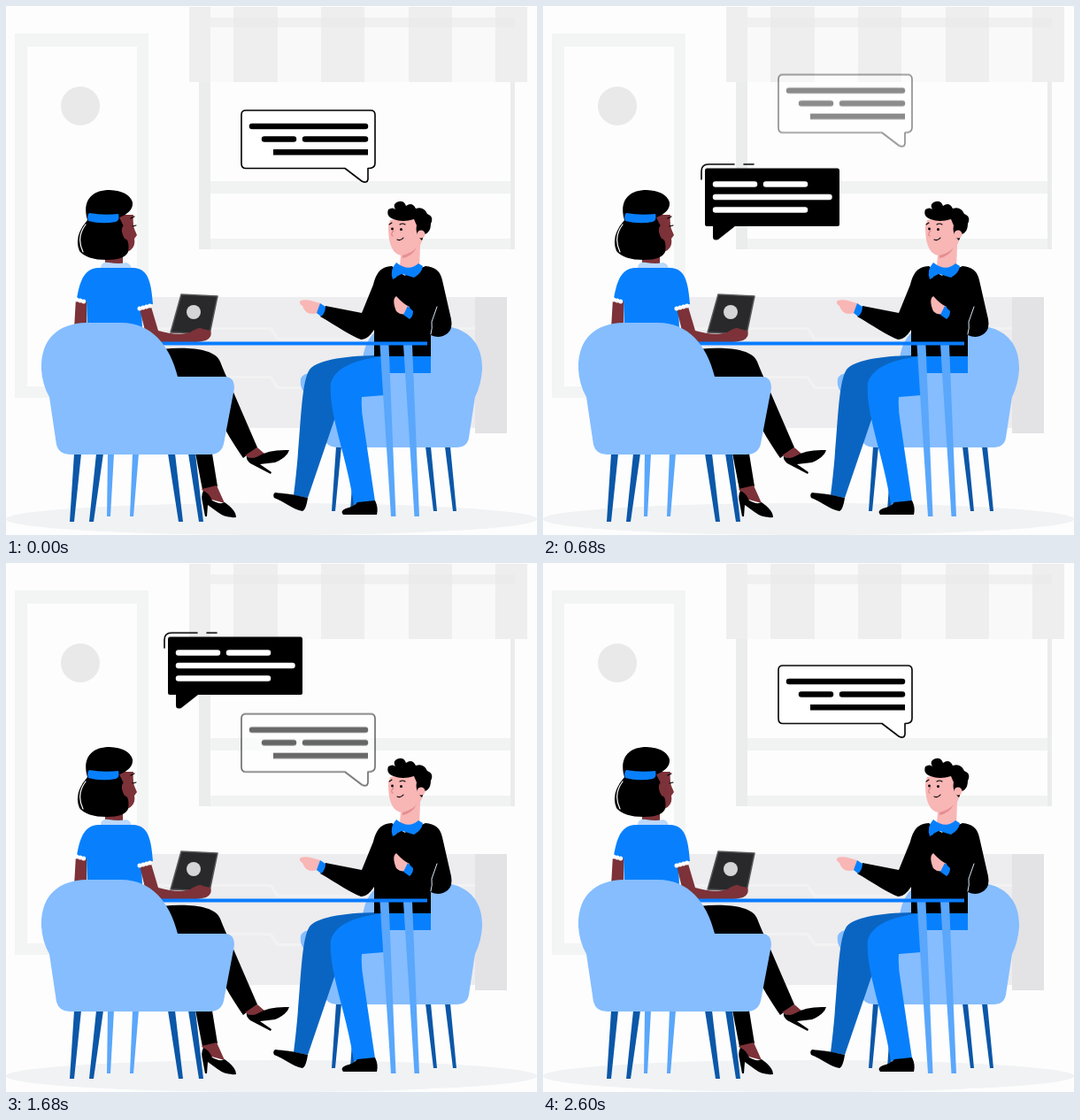
Recreate the animation shown at these times as an HTML page. Size 600 by 598 pixels, loop 2.64 s.

```html
<!DOCTYPE html>
<html lang="en">
<head>
<meta charset="utf-8">
<title>Conversation at a table</title>
<style>
html, body { margin: 0; width: 100%; height: 100%; overflow: hidden; background: #fdfdfd; }
svg { display: block; width: 100%; height: 100%; }
.round { stroke-linecap: round; stroke-linejoin: round; }
.skin { fill: #7c3238; }
.pink { fill: #f8b6b5; }
.blue { fill: #0880fd; }
.pale { fill: #85bdff; }
.navy { fill: #0b57a8; }
.sky { fill: #5aa7fb; }
.line { fill: none; stroke-linecap: round; }
#reply { animation: reply-rise 2640ms linear infinite, reply-fade 2640ms linear infinite; }
#ask { animation: ask-rise 2640ms linear infinite, ask-fade 2640ms linear infinite; }
@keyframes reply-rise {
  0% { transform: translateY(0); }
  30% { transform: translateY(-47px); }
  58.3% { transform: translateY(61px); }
  100% { transform: translateY(-4.4px); }
}
@keyframes reply-fade {
  0%, 20.83% { opacity: 1; }
  29.92%, 58.33% { opacity: 0; }
  67.42%, 100% { opacity: 1; }
}
@keyframes ask-rise {
  0%, 1.52% { transform: translateY(25px); }
  12.12% { transform: translateY(0); }
  25.76% { transform: translateY(-32px); }
  36.36% { transform: translateY(-60.5px); }
  51.52% { transform: translateY(-98.5px); }
  63.64% { transform: translateY(-132px); }
  74.24% { transform: translateY(-170.5px); }
  75%, 100% { transform: translateY(-173px); }
}
@keyframes ask-fade {
  0%, 1.52% { opacity: 0; }
  10.61%, 65.91% { opacity: 1; }
  74.8%, 100% { opacity: 0; }
}
</style>
</head>
<body>
<svg viewBox="0 0 600 598" preserveAspectRatio="none">
  <!-- room -->
  <rect width="600" height="598" fill="#fdfdfd"/>
  <path fill="#f3f4f4" fill-rule="evenodd" d="M10 31H161V443H10ZM24 46V430H148V46Z"/>
  <circle cx="84" cy="113" r="22" fill="#e9e9ea"/>
  <g fill="#f1f2f2">
    <path fill-rule="evenodd" d="M218 13H575V275H218ZM231 24V263H570V24Z"/>
    <path d="M231 198H570V212H231Z"/>
  </g>
  <path fill="#ebecec" d="M218 13h13v262h-13ZM570 13h5v262h-5Z"/>
  <path fill="#f9f9f9" fill-opacity=".8" d="M207 1H589V86H207Z"/>
  <path fill="#eeeeee" fill-opacity=".9" d="M257 1h50v85h-50ZM356 1h49v85h-49ZM455 1h49v85h-49ZM553 1h36v85h-36ZM207 1h24v85h-24Z"/>
  <path fill="#e9e9ea" fill-opacity=".5" d="M231 13H575V24H231Z"/>
  <path fill="#edecee" d="M160 329H530V477H160Z"/>
  <path fill="#e3e2e5" d="M530 329H566V483H530Z"/>
  <path fill="#f2f2f3" d="M160 363H300L308 375H415L423 363H530V366H425L417 378H306L298 366H160ZM160 418H300L308 430H415L423 418H530V421H425L417 433H306L298 421H160Z"/>
  <ellipse cx="300" cy="580" rx="300" ry="18" fill="#f0f2f4"/>

  <!-- right chair -->
  <path class="navy" d="M373 498h6l-7 73h-4ZM394 498h6l-7 73h-4ZM474 498h6l7 73h-4ZM496 498h6l7 73h-4Z"/>
  <path class="pale" d="M440 361H488C521 362 539 381 538 411Q537 428 530 442L523 488Q521 499 509 499H374Q362 499 359 488L345 440Q331 437 333 421Q336 414 348 415L402 410C403 384 412 361 440 361Z"/>

  <!-- man -->
  <path fill="#0a65c2" d="M424 395C388 395 353 399 343 411C332 428 334 485 325 553L341 556L373 462L424 414Z"/>
  <path class="blue" d="M480 395V415H427V440L402 442Q401 456 404 472L417 560L393 563C384 505 364 460 367 426C373 406 402 397 440 395Z"/>
  <path d="M304 550C314 551 324 552 327 553L341 556C340 563 338 570 335 571C324 569 314 560 303 556Q301 552 304 550Z"/>
  <path d="M397 561L417 559Q421 567 419 575H381Q377 571 384 568Q393 566 397 561Z"/>
  <path class="pink" d="M447 270H468L467 298Q456 306 445 294Z"/>
  <path d="M436 294C424 295 419 300 415 315L402 347L361 339L355 351C374 362 390 373 401 377Q408 378 416 366V396H480V372Q490 377 499 370Q505 365 503 354L493 310Q490 295 474 294L450 305Z"/>
  <path class="line" stroke="#dce8f7" stroke-width="1" d="M487 340L481 357Q482 364 480 371"/>
  <path class="blue" d="M441 290Q433 299 437 309L448 303L461 307Q470 302 471 294L466 291Q455 301 441 290Z"/>
  <path d="M441 306L447 303L453 306L452 312L447 309L443 312Z"/>
  <path class="pink" d="M432 249C432 266 435 280 447 282Q467 281 471 262V242L445 240L434 242Z"/>
  <path fill="#e58f91" d="M448 282Q459 279 464 273Q459 283 448 285Z"/>
  <path d="M438 241Q429 238 432 230Q437 227 440 230Q436 223 444 221Q450 220 452 226Q459 221 463 229Q472 226 476 235Q484 238 480 246Q480 256 473 258L470 265Q462 258 464 248L461 241Q448 245 438 241Z"/>
  <circle cx="436.500" cy="252" r="1.400"/>
  <circle cx="446.500" cy="252.500" r="1.500"/>
  <path class="line" stroke="#000" stroke-width="1.100" d="M442 264Q446 266 449 262M433 247l3-2M445 247q3-2 6 0"/>
  <path class="line" stroke="#d98486" stroke-width="1.100" d="M438 254Q434 258 437 260"/>
  <circle class="pink" cx="469" cy="258" r="4.500"/>
  <path class="pink" d="M355 336C347 334 340 331 333 333Q330 336 335 339Q338 348 346 348L354 347Z"/>
  <path class="blue" d="M355 336L361 340Q361 347 356 351L351 347Z"/>
  <path class="pink" d="M441 328C436 331 439 340 441 345Q446 350 453 348L456 340Q449 337 441 328Z"/>
  <path class="blue" d="M454 339L460 345Q460 351 456 354L449 349Z"/>

  <!-- table -->
  <path class="sky" d="M422.500 383h10l8 194h-5.500ZM449 383h10l8 194h-5.500Z"/>

  <!-- woman -->
  <path d="M176 388C205 385 236 387 242 402Q247 415 255 432L284 499L268 511C252 488 242 470 230 440L180 420Z"/>
  <path d="M213 500H232L239 543L222 547Z"/>
  <path class="skin" d="M270 508L284 499L292 506L282 514ZM221 546L238 542L247 562L229 557Z"/>
  <path d="M272 509Q278 513 285 509Q297 501 320 502Q318 510 304 516L287 518L300 527L299 529L276 517Q271 513 272 509Z"/>
  <path d="M223 548Q229 550 233 559Q242 564 247 561Q260 570 260 578Q248 579 239 572L228 564L227 577H225L222 561Q220 553 223 548Z"/>
  <path class="skin" d="M79 330L91 332V365H77ZM112 280H132V296H112Z"/>
  <path fill="#b9d8fb" d="M107 295Q108 289 116 290Q128 292 136 290Q142 292 142 298H107Z"/>
  <path class="blue" d="M104 296C90 297 84 307 80 331L91 334L92 365H154L153 340L166 337C164 310 160 297 144 296Z"/>
  <path fill="#29292b" stroke="#58585b" stroke-width="1.500" class="round" d="M198 326L239 328L230 371L186 369Z"/>
  <circle cx="212" cy="346" r="8" fill="#d5d5d8"/>
  <path class="skin" d="M151 342L164 340L172 367C185 371 199 372 208 369Q219 362 222 365L231 367Q234 374 226 378Q215 381 205 380H174Q162 379 158 371Z"/>
  <path class="line" stroke="#fff" stroke-width="5" stroke-dasharray="0 4" d="M80 332L91 335M151 342L166 338"/>
  <path class="skin" d="M128 236H144Q143 246 145 252L148 259L145 263Q147 274 137 278L126 282Z"/>
  <path d="M92 242C86 222 95 208 117 208Q139 209 143 222Q144 233 128 239L133 249Q129 255 134 263Q140 264 138 278Q134 287 114 287Q91 287 83 277Q76 260 92 242Z"/>
  <path class="skin" d="M137 247Q130 247 131 255Q133 263 139 261Z"/>
  <path class="blue" d="M94 234Q110 237 127 235Q129 242 124 244Q108 247 93 243Q91 237 94 234Z"/>
  <path class="line" stroke="#fff" stroke-width="1.200" d="M90 247Q79 261 87 278"/>
  <path class="line" stroke="#000" stroke-width="1.200" d="M141 240l4-2M143 249l4-1"/>

  <path fill="#0a7cff" d="M172 379.500H476V383.500H172Z"/>

  <!-- left chair -->
  <path class="sky" d="M115 506h7l-4 71h-4ZM143 506h7l-6 71h-4Z"/>
  <path class="navy" d="M77 506h8l-8 77h-5ZM102 506h8l-11 77h-5ZM183 506h8l9 77h-5ZM206 506h8l9 77h-5Z"/>
  <path class="pale" d="M40 411C39 377 58 359 91 358H130C164 358 185 383 194 419H247Q258 419 258 432L246 495Q243 507 230 507H72Q60 507 57 496L49 442Q41 428 40 411Z"/>

  <!-- speech -->
  <g id="reply" class="round">
    <path fill="#fff" stroke="#000" stroke-width="1.600" d="M271 118H412Q417 118 417 123V178Q417 183.500 409 183.500V196Q408 201 402 198L383 183.500H271Q266 183.500 266 178V123Q266 118 271 118Z"/>
    <path fill="none" stroke="#000" stroke-width="6.500" d="M278 136H406M292 150.500H325M338 150.500H406"/>
    <path d="M302 162H409V168.500H302Z"/>
  </g>
  <g id="ask" class="round">
    <path d="M185 215.500H333Q335 215.500 335 218V279Q335 281 333 281H217L198 296Q192 298 192 293V281H185Q183 281 183 279V218Q183 215.500 185 215.500Z"/>
    <path fill="none" stroke="#fff" stroke-width="6.500" d="M195 233.500H239M252 233.500H296M195 248H323.500M195 262.500H296"/>
    <path fill="none" stroke="#000" stroke-width="1.600" d="M179 228V219Q179 211 187 211H216M227 211H238"/>
  </g>
</svg>
</body>
</html>
```
